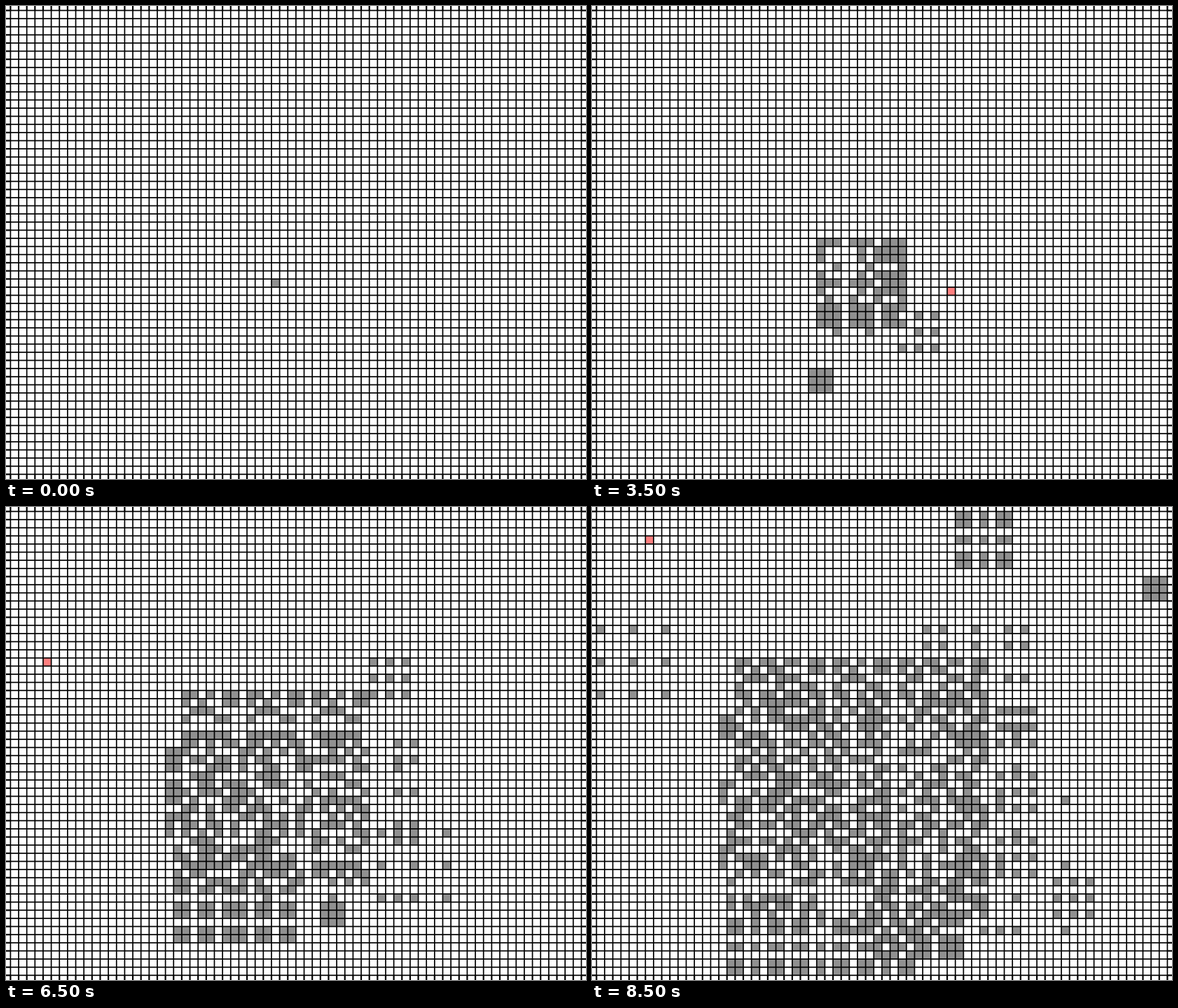
An HTML page with a canvas that plays this animation: 828x676 px, repeating every 10 s.

```html
<!DOCTYPE html>
<html lang="en">
<head>
<meta charset="utf-8">
<title>Parity automaton</title>
<style>
  html, body { margin: 0; width: 100%; height: 100%; overflow: hidden; background: #fff; }
  canvas { display: block; }
</style>
</head>
<body>
<canvas id="stage" width="828" height="676"></canvas>
<script>
const W = 828, H = 676, COLS = 70, ROWS = 57;
const LOOP = 10000, HOLD = 1500, STEP = 500;
const ctx = document.getElementById('stage').getContext('2d');
const lineX = c => 6.4 + 11.643 * c;
const lineY = r => 6.4 + 11.63 * r;

// One cell [column, row] is flipped in every generation.
const flips = [
  [32, 33], [33, 35], [31, 32], [39, 39], [27, 45], [43, 34], [24, 34], [49, 43],
  [34, 33], [46, 20], [39, 49], [4, 18], [47, 3], [58, 47], [68, 9], [6, 3]
];

const emptyGrid = () => Array.from({ length: ROWS }, () => new Uint8Array(COLS));

// A cell lives when an odd number of cells in its 3x3 block is alive.
function evolve(grid) {
  const next = emptyGrid();
  for (let r = 0; r < ROWS; r++) {
    for (let c = 0; c < COLS; c++) {
      for (let dr = -1; dr <= 1; dr++) {
        for (let dc = -1; dc <= 1; dc++) {
          next[r][c] ^= grid[r + dr]?.[c + dc] ?? 0;
        }
      }
    }
  }
  return next;
}

const generations = [];
let current = emptyGrid();
for (const [c, r] of flips) {
  current = evolve(current);
  current[r][c] ^= 1;
  generations.push(current);
}

function fillCell(c, r, color) {
  ctx.fillStyle = color;
  ctx.fillRect(lineX(c), lineY(r), lineX(c + 1) - lineX(c), lineY(r + 1) - lineY(r));
}

function drawLines() {
  const thin = 1.7, bold = 2.2;
  const left = lineX(0), right = lineX(COLS), top = lineY(0), bottom = lineY(ROWS);
  const vertical = (x, y0, y1, w) => ctx.fillRect(x - w / 2, y0, w, y1 - y0);
  const horizontal = (y, x0, x1, w) => ctx.fillRect(x0, y - w / 2, x1 - x0, w);
  ctx.fillStyle = '#000';
  for (let c = 0; c <= COLS; c++) {
    vertical(lineX(c), 0, top, bold);
    vertical(lineX(c), top, bottom, thin);
    vertical(lineX(c), bottom, H, bold);
  }
  for (let r = 0; r <= ROWS; r++) {
    horizontal(lineY(r), 0, left, bold);
    horizontal(lineY(r), left, right, thin);
    horizontal(lineY(r), right, W, bold);
  }
}

function draw(index) {
  ctx.fillStyle = '#fff';
  ctx.fillRect(0, 0, W, H);
  generations[index].forEach((row, r) => row.forEach((alive, c) => {
    if (alive) fillCell(c, r, '#909090');
  }));
  if (index > 0) fillCell(...flips[index], '#ff7f7f');
  drawLines();
}

let shown = -1;
function tick(now) {
  const t = now % LOOP;
  const index = t < HOLD ? 0 : Math.min(flips.length - 1, 1 + Math.floor((t - HOLD) / STEP));
  if (index !== shown) draw(shown = index);
  requestAnimationFrame(tick);
}
tick(performance.now());
</script>
</body>
</html>
```
